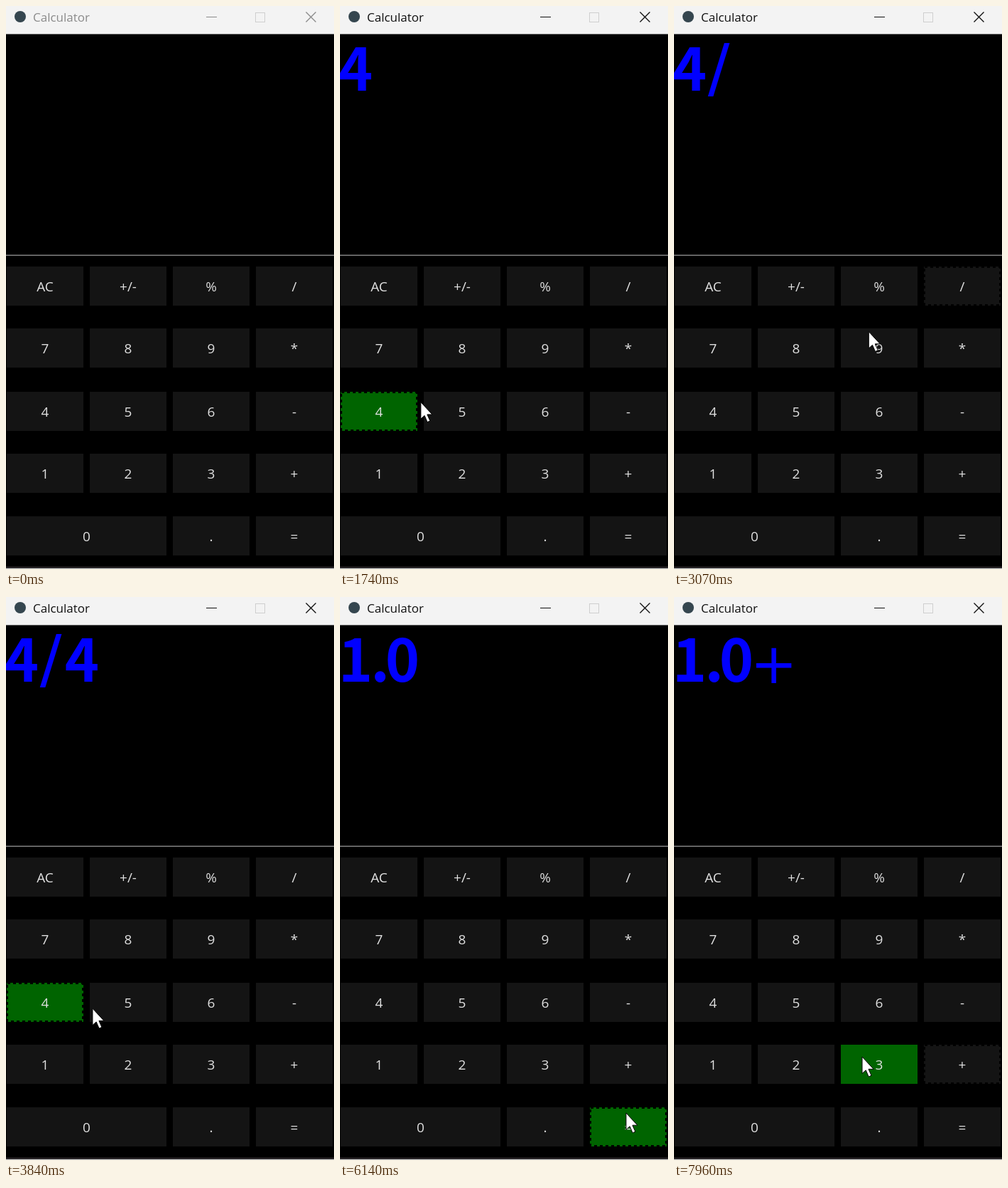
Write an HTML page with a canvas that moves like this. It is 462 px wide and 791 px high and loops after 8 s.

```html
<!DOCTYPE html>
<html lang="en">
<head>
<meta charset="utf-8">
<title>Calculator</title>
<style>
  html, body { margin: 0; width: 462px; height: 791px; overflow: hidden; background: #000; }
  canvas { display: block; }
</style>
</head>
<body>
<canvas id="stage" width="462" height="791"></canvas>
<script>
const ctx = document.getElementById('stage').getContext('2d');
const LOOP = 8000;
const HOVER_LAG = 50;

const rows = [366, 453, 542, 629, 717];
const labels = ['AC +/- % /', '7 8 9 *', '4 5 6 -', '1 2 3 +', '0 . ='];
const buttons = labels.flatMap((line, r) => line.split(' ').map((label, i) => {
  const wide = label === '0';
  const col = r === 4 && i > 0 ? i + 1 : i;
  return { label, x: 1 + col * 117, y: rows[r], w: wide ? 225 : 108, h: 55 };
}));

// Pointer path: time, x, y
const path = [
  [70, 409, 785], [200, 409, 785], [330, 395, 745], [560, 255, 672], [780, 103, 585], [910, 78, 558],
  [1610, 78, 558], [1800, 130, 556], [2000, 240, 550], [2220, 378, 514], [2340, 396, 440],
  [2430, 402, 405], [2630, 404, 392],
  [2910, 404, 392], [2970, 385, 400], [3070, 275, 457], [3240, 155, 545], [3440, 80, 560],
  [3780, 80, 560], [4100, 300, 655], [4230, 352, 686], [4300, 360, 688], [4620, 412, 736], [4700, 413, 737],
  [6080, 413, 737], [6140, 403, 725], [6500, 388, 680], [6890, 381, 645], [6950, 380, 644],
  [7760, 380, 644], [7820, 365, 645], [7960, 265, 646], [LOOP, 265, 646]
];

// Each press moves the focus ring; the display follows on release.
const presses = [[1340, '4'], [2700, '/'], [3570, '4'], [4880, '='], [7090, '+']];
const readouts = [
  [1400, [['4', 22]]],
  [2770, [['4', 22], ['/', 63]]],
  [3640, [['4', 22], ['/', 63], ['4', 107]]],
  [4950, [['1', 22], ['.', 56.5], ['0', 88]]],
  [7160, [['1', 22], ['.', 56.5], ['0', 88], ['+', 140.5]]]
];

const latest = (list, t) => list.filter(([at]) => at <= t).pop()?.[1];

function pointerAt(t) {
  const i = path.findIndex(p => p[0] > t);
  if (i < 1) return null;
  const [t0, x0, y0] = path[i - 1], [t1, x1, y1] = path[i];
  const k = (t - t0) / (t1 - t0);
  return { x: x0 + (x1 - x0) * k, y: y0 + (y1 - y0) * k };
}

function rect(x, y, w, h, color) {
  ctx.fillStyle = color;
  ctx.fillRect(x, y, w, h);
}

function text(str, x, y, font, color, align = 'center') {
  ctx.font = font;
  ctx.fillStyle = color;
  ctx.textAlign = align;
  ctx.fillText(str, x, y);
}

function drawTitleBar(active) {
  const ink = active ? '#111' : '#8b8b8b';
  rect(0, 0, 462, 39, '#f3f3f3');
  rect(0, 39, 462, 1, '#777');
  ctx.fillStyle = '#35464f';
  ctx.beginPath();
  ctx.arc(20, 15, 8, 0, 7);
  ctx.fill();
  text('Calculator', 38, 22, '17px "Open Sans", sans-serif', ink, 'left');
  ctx.lineWidth = 1;
  rect(282, 15, 15, 1, ink);
  ctx.strokeStyle = '#cfcfcf';
  ctx.strokeRect(351.5, 9.5, 13, 13);
  ctx.strokeStyle = ink;
  ctx.lineWidth = 1.4;
  ctx.stroke(new Path2D('M422.5 8.5l14 14m0-14l-14 14'));
}

function drawReadout(glyphs = []) {
  const fonts = {
    '/': '91px "DejaVu Sans", sans-serif',
    '+': '79px "DejaVu Sans", sans-serif'
  };
  const digits = 'bold 82px "Noto Sans CJK SC", "Noto Sans CJK JP", "Noto Sans CJK", sans-serif';
  for (const [char, x] of glyphs) {
    text(char, x, char === '+' ? 121 : 119, fonts[char] || digits, '#00f');
  }
}

function drawButton({ label, x, y, w, h }, pointer, focused) {
  const hover = pointer && pointer.x >= x && pointer.x < x + w && pointer.y >= y && pointer.y < y + h;
  rect(x, y, w, h, hover ? '#006400' : '#141414');
  if (focused) {
    ctx.strokeStyle = '#000';
    ctx.lineWidth = 2;
    ctx.setLineDash([4, 4]);
    ctx.strokeRect(x + 1, y + 1, w - 2, h - 2);
    ctx.setLineDash([]);
  }
  text(label, x + w / 2, y + 35, '19px "Open Sans", sans-serif', '#e0e0e0');
}

const arrow = new Path2D('M0 0V23.5L5.2 18.8L9.2 28L13 26.3L9 17.3H16Z');
function drawPointer({ x, y }) {
  ctx.save();
  ctx.translate(x, y);
  ctx.fillStyle = '#fff';
  ctx.strokeStyle = '#000';
  ctx.lineWidth = 1;
  ctx.fill(arrow);
  ctx.stroke(arrow);
  ctx.restore();
}

function draw(now) {
  const t = now % LOOP;
  const focus = latest(presses, t);
  const pointer = pointerAt(t);
  const hoverPoint = pointerAt(t - HOVER_LAG);

  rect(0, 0, 462, 791, '#000');
  drawTitleBar(t >= presses[0][0]);
  drawReadout(latest(readouts, t));
  rect(0, 349.5, 462, 1.5, '#808080');
  for (const b of buttons) drawButton(b, hoverPoint, b.label === focus);
  rect(0, 788, 462, 1, '#4c454a');
  rect(0, 790, 462, 1, '#f0f0f0');
  if (pointer) drawPointer(pointer);
  requestAnimationFrame(() => draw(performance.now()));
}
draw(0);
</script>
</body>
</html>
```
